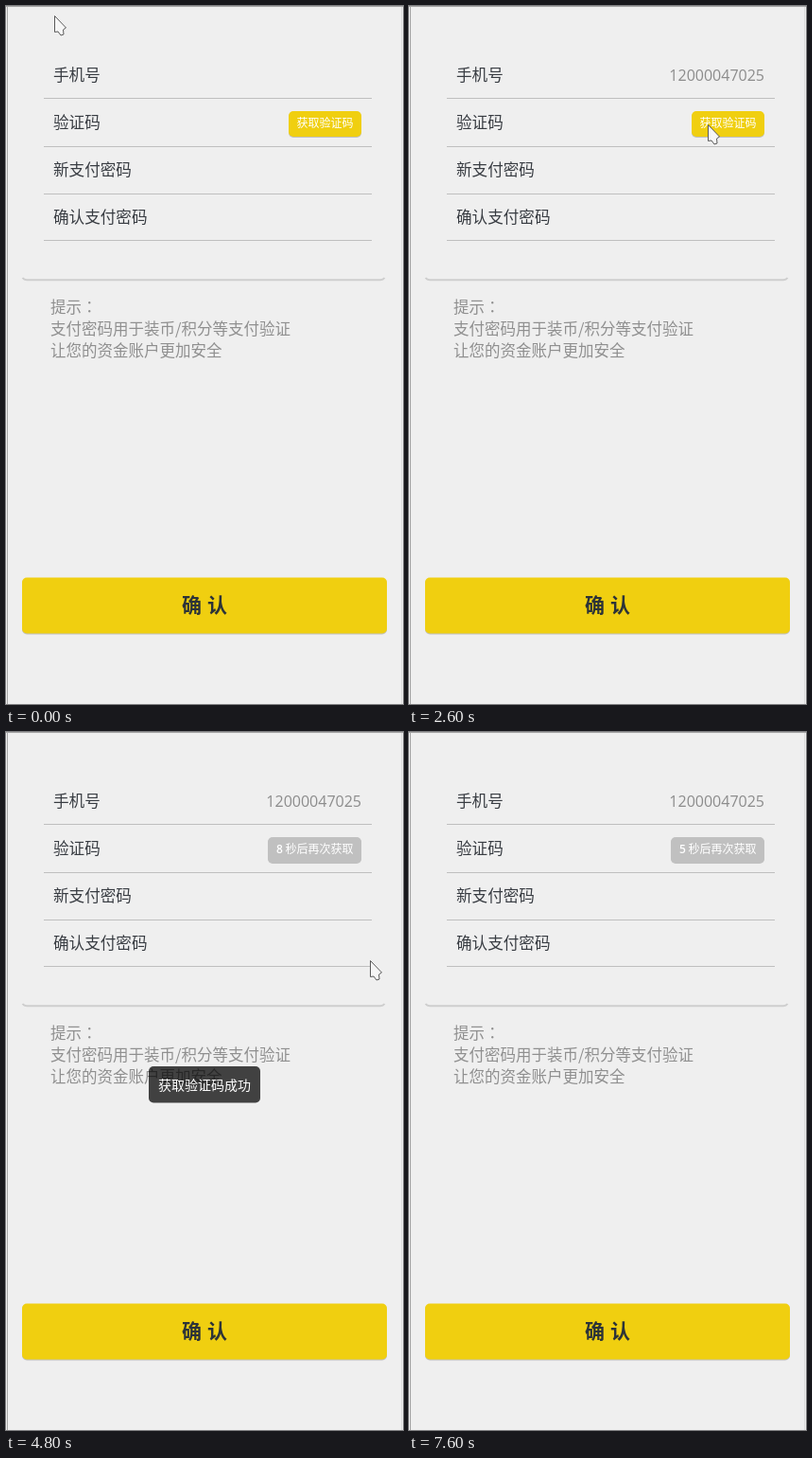
These frames come from a looping animation (420x737 px, 8 s). An HTML page:

```html
<!DOCTYPE html>
<html lang="zh-CN">
<head>
<meta charset="utf-8">
<title>支付密码</title>
<style>
html, body { margin: 0; width: 100%; height: 100%; overflow: hidden; background: #efefef; }
svg { display: block; width: 100%; height: 100%; }
text { font-family: "Noto Sans CJK SC", "Noto Sans CJK", "Noto Sans", sans-serif; white-space: pre; }
.label { font-size: 16.6px; fill: #383c42; }
.tip { font-size: 16.5px; fill: #8f8f8f; }
.colon { font-family: "Noto Sans CJK TC", "Noto Sans CJK", sans-serif; }
.number { font: 16px "Open Sans", "Noto Sans", sans-serif; fill: #8c8c8c; text-anchor: end; }
.small { font-size: 12px; fill: #fff; text-anchor: end; }
.digits { font: 600 12px "Open Sans", "Noto Sans", sans-serif; }
.message { fill: #fff; text-anchor: middle; }
.yellow { fill: #f0cf10; }
.raised { filter: drop-shadow(0 1.5px .7px #0003); }

.anim { animation: 8s step-end infinite; }
#arrow { animation-name: move; }
#beam { opacity: 0; animation-name: beam; }
#focus { opacity: 0; animation-name: focus; }
#phone { opacity: 0; animation-name: phone; }
#send { animation-name: send; }
#wait { opacity: 0; animation-name: wait; }
#loader { opacity: 0; animation-name: loader; }
#toast { opacity: 0; animation-name: toast; }
#spinner { transform-origin: 210px 355px; animation: spin .8s steps(4) infinite; }

@keyframes move {
  0% { transform: translate(51px, 10px); }
  2.5% { transform: translate(110px, 25px); }
  5% { transform: translate(205px, 50px); }
  7.5% { transform: translate(300px, 64px); opacity: 0; }
  20% { transform: translate(296px, 100px); opacity: 1; }
  22.5% { transform: translate(296px, 112px); }
  25% { transform: translate(300px, 114px); }
  27.5% { transform: translate(306px, 118px); }
  30% { transform: translate(312px, 122px); }
  32.5% { transform: translate(316px, 125px); }
  35% { transform: translate(320px, 129px); }
  37.5% { transform: translate(340px, 165px); }
  40% { transform: translate(376px, 222px); }
  42.5% { transform: translate(385px, 241px); }
  67.5% { transform: translate(376px, 232px); }
  70% { transform: translate(325px, 190px); }
  72.5% { transform: translate(240px, 120px); }
  75% { transform: translate(150px, 60px); }
  77.5% { transform: translate(82px, 12px); }
  80% { transform: translate(50px, -19px); }
  82.5%, 100% { transform: translate(50px, -40px); }
}
@keyframes beam { 0% { opacity: 0; } 7.5% { opacity: 1; } 20%, 100% { opacity: 0; } }
@keyframes focus { 0% { opacity: 0; } 10% { opacity: 1; } 32.5%, 100% { opacity: 0; } }
@keyframes phone { 0% { opacity: 0; } 17.5%, 100% { opacity: 1; } }
@keyframes send { 0% { opacity: 1; } 35%, 100% { opacity: 0; } }
@keyframes wait { 0% { opacity: 0; } 35%, 100% { opacity: 1; } }
@keyframes loader { 0% { opacity: 0; } 35% { opacity: .37; } 37.5% { opacity: 1; } 42.5%, 100% { opacity: 0; } }
@keyframes toast {
  0% { opacity: 0; }
  42.5% { opacity: .57; }
  45% { opacity: 1; }
  80% { opacity: .19; }
  82.5%, 100% { opacity: 0; }
}
@keyframes spin { to { transform: rotate(360deg); } }
</style>
</head>
<body>
<svg viewBox="0 0 420 737">
  <rect width="420" height="737" fill="#efefef"/>
  <path d="M0 .5H420M1.5 0V737" stroke="#a6a6a6"/>
  <path d="M418.5 1V737" stroke="#dcdcdc"/>

  <path d="M17.5 287Q19 289.2 22 289.2H396Q399 289.2 400.5 287" fill="none" stroke="#cecece" stroke-width="2"/>
  <path d="M40 97.5H387M40 148.5H387M40 198.5H387M40 247.5H387" stroke="#bfbfbf"/>

  <g class="label">
    <text x="50" y="79">手机号</text>
    <text x="50" y="129">验证码</text>
    <text x="50" y="179">新支付密码</text>
    <text x="50" y="229">确认支付密码</text>
  </g>

  <g id="focus" class="anim" fill="none">
    <rect x="199" y="61" width="177" height="23" rx="1.5" stroke="#e6bb68" stroke-width="2"/>
    <path d="M375.5 64V82" stroke="#555"/>
  </g>
  <text id="phone" class="number anim" x="376" y="79">12000047025</text>

  <g id="send" class="anim">
    <rect class="yellow raised" x="299" y="111" width="77" height="27" rx="5"/>
    <text class="small" x="367.5" y="128">获取验证码</text>
  </g>
  <g id="wait" class="anim">
    <rect id="waitBox" class="raised" x="270" y="111" width="106" height="27" rx="5" fill="#c0c0c0"/>
    <text class="small" x="367.5" y="128"><tspan id="count" class="digits">10</tspan> 秒后再次获取</text>
  </g>

  <g class="tip">
    <text x="47" y="324">提示<tspan class="colon" lang="zh-TW">：</tspan></text>
    <text x="47" y="347">支付密码用于装币/积分等支付验证</text>
    <text x="47" y="370">让您的资金账户更加安全</text>
  </g>

  <rect class="yellow raised" x="17" y="603.5" width="386" height="59" rx="5"/>
  <text x="210" y="640" font-size="21" font-weight="700" fill="#2c3338" text-anchor="middle" word-spacing="1.3">确 认</text>

  <g id="loader" class="anim">
    <rect x="160" y="319" width="100" height="106" rx="5" fill="#000" fill-opacity=".73"/>
    <path id="spinner" d="M201 344A14 14 0 0 1 223 349" fill="none" stroke="#fff" stroke-width="3"/>
    <text class="message" x="210" y="401.5" font-size="15.8">加载中...</text>
  </g>
  <g id="toast" class="anim">
    <rect x="151" y="353" width="118" height="38.5" rx="5" fill="#000" fill-opacity=".73"/>
    <text class="message" x="210" y="378" font-size="14">获取验证码成功</text>
  </g>

  <path id="beam" class="anim" d="M297 65.5H303M300 65.5V81.5M297 81.5H303" fill="none" stroke="#555"/>
  <path id="arrow" class="anim" d="M.5.5V17.5L4 17 7 21 10 20 9.5 15 12.5 13Z" fill="#f6f6f6" stroke="#5a5a5a"/>
</svg>
<script>
const count = document.getElementById("count");
const waitBox = document.getElementById("waitBox");
const ticks = [3800, 4800, 5800, 6800, 7600];
let start;

function draw(now) {
  start ??= now;
  const time = (now - start) % 8000;
  const left = 10 - ticks.filter(tick => time >= tick).length;
  const x = left > 9 ? 270 : 277;
  count.textContent = left;
  waitBox.setAttribute("x", x);
  waitBox.setAttribute("width", 376 - x);
  requestAnimationFrame(draw);
}
requestAnimationFrame(draw);
</script>
</body>
</html>
```
